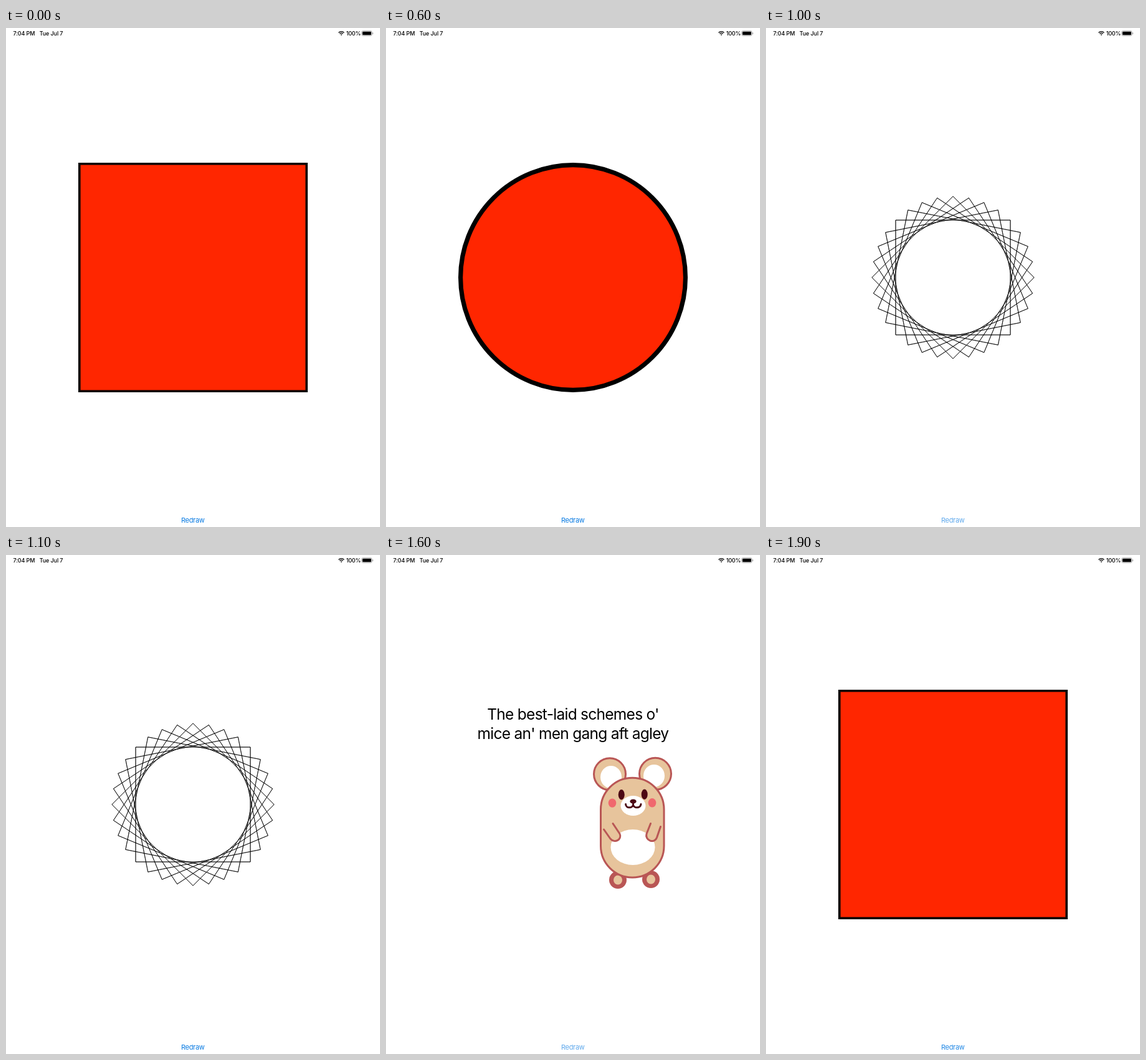
An HTML page with a canvas for the animation above (2000 ms loop, 600 by 800 pixels).

```html
<!DOCTYPE html>
<html lang="en">
<head>
<meta charset="utf-8">
<title>Redraw</title>
<style>
  html, body { margin: 0; width: 100%; height: 100%; overflow: hidden; background: #fff; }
  canvas { display: block; width: 600px; height: 800px; }
</style>
</head>
<body>
<canvas id="stage" width="600" height="800"></canvas>
<script>
const ctx = document.getElementById('stage').getContext('2d');
const LOOP = 2000;
const UNIT = 368 / 512; // the 512-point drawing is shown 368 px wide
const RED = '#ff2600', TAN = '#e7c49c', EDGE = '#b95655', DARK = '#4c0814', PINK = '#f0686e';
const FONT = 'Inter, "Liberation Sans", sans-serif';

function text(str, x, y, size, { weight = 400, color = '#000', align = 'left', spacing = 0 } = {}) {
  ctx.font = `${weight} ${size}px ${FONT}`;
  ctx.letterSpacing = spacing + 'px';
  ctx.textAlign = align;
  ctx.fillStyle = color;
  ctx.fillText(str, x, y);
}

function paint(fill, stroke, width) {
  if (fill) { ctx.fillStyle = fill; ctx.fill(); }
  if (stroke) { ctx.strokeStyle = stroke; ctx.lineWidth = width; ctx.stroke(); }
}

function oval(x, y, rx, ry, fill, stroke, width) {
  ctx.beginPath();
  ctx.ellipse(x, y, rx, ry, 0, 0, Math.PI * 2);
  paint(fill, stroke, width);
}

function rounded(x, y, w, h, r, fill, stroke, width) {
  ctx.beginPath();
  ctx.roundRect(x, y, w, h, r);
  paint(fill, stroke, width);
}

function shape(d, fill, stroke, width) {
  const path = new Path2D(d);
  if (fill) { ctx.fillStyle = fill; ctx.fill(path); }
  if (stroke) { ctx.strokeStyle = stroke; ctx.lineWidth = width; ctx.stroke(path); }
}

// Runs a drawing in its own 512-point space, clipped to it.
function inCanvas(draw) {
  ctx.save();
  ctx.translate(116, 216);
  ctx.scale(UNIT, UNIT);
  ctx.beginPath();
  ctx.rect(0, 0, 512, 512);
  ctx.clip();
  ctx.beginPath();
  draw();
  ctx.restore();
}

const square = () => inCanvas(() => {
  ctx.rect(0, 0, 512, 512);
  paint(RED, '#000', 10);
});

const circle = () => inCanvas(() => oval(256, 256, 251, 251, RED, '#000', 10));

const checkers = () => {
  ctx.fillStyle = '#000';
  for (let row = 0; row < 8; row++) {
    for (let col = row % 2; col < 8; col += 2) ctx.fillRect(116 + col * 46, 216 + row * 46, 46, 46);
  }
};

const rosette = () => inCanvas(() => {
  ctx.translate(256, 256);
  for (let i = 0; i < 16; i++) {
    ctx.rotate(Math.PI / 16);
    ctx.rect(-128, -128, 256, 256);
  }
  paint(null, '#000', 1);
});

const swirl = () => inCanvas(() => {
  ctx.translate(256, 256);
  let length = 256;
  for (let i = 0; i < 256; i++) {
    ctx.rotate(Math.PI / 2);
    ctx.lineTo(length, 50);
    length *= 0.99;
  }
  paint(null, '#000', 1);
});

function mouse() {
  ctx.lineCap = ctx.lineJoin = 'round';
  oval(359, 351.3, 25.5, 25.5, TAN, EDGE, 3);
  oval(432, 350.8, 25.5, 25.5, TAN, EDGE, 3);
  oval(361, 356, 17, 18, '#fff');
  oval(430, 354, 17, 18, '#fff');

  for (const [x, y] of [[372, 521], [425, 520]]) {
    oval(x, y, 14, 14, EDGE);
    oval(x, y, 7, 7.5, TAN);
  }

  rounded(344.5, 357.3, 101.5, 159.7, 50.7, TAN, EDGE, 3);
  oval(396, 468.5, 35.5, 28.5, '#fff');
  shape('M349.5 440L360 455C367 463 379 456 375 447L364 430.5', TAN, EDGE, 3);
  shape('M424.5 430.5L418 447C415 457 430 464 434.5 453L440.5 435.5', TAN, EDGE, 3);

  oval(396.5, 402, 20, 16, '#fff');
  oval(377.7, 384.3, 5, 8.2, DARK);
  oval(414.7, 383.7, 5, 8.2, DARK);
  oval(363, 397.6, 6.3, 7.2, PINK);
  oval(427, 397.3, 6.3, 7.2, PINK);
  oval(396.5, 395, 5.2, 3.5, DARK);
  shape('M384.5 399.5C385 407 396 406 396.5 400C397 406 408 407 409 399.5M396.5 396V400', null, DARK, 3);
}

function poem() {
  const style = { align: 'center', spacing: -0.73 };
  text("The best-laid schemes o'", 300, 263.8, 24.5, style);
  text("mice an' men gang aft agley", 300, 294.7, 24.5, style);
  mouse();
}

function statusBar() {
  const style = { weight: 500, spacing: -0.12 };
  text('7:04 PM', 11.5, 11.8, 9, style);
  text('Tue Jul 7', 53.7, 11.8, 9, style);
  text('100%', 545.8, 11.8, 9, { weight: 500, spacing: -0.25 });

  ctx.lineCap = 'butt';
  for (const r of [0.9, 3.7, 6.3]) {
    ctx.beginPath();
    ctx.arc(538, 11.9, r, -Math.PI * 0.75, -Math.PI * 0.25);
    paint(null, '#000', r < 1 ? 1.8 : 1.4);
  }
  rounded(570.6, 4.6, 16.6, 7.8, 2.2, null, '#999', 0.8);
  rounded(571.8, 5.8, 14.2, 5.4, 1.2, '#000');
  rounded(588, 7, 1, 3, 0.5, '#999');
}

// start time, drawing, button opacity
const SCENES = [
  [0, square, 1],
  [500, circle, 0.65], [600, circle, 1],
  [800, checkers, 0.92], [900, checkers, 1],
  [1000, rosette, 0.65], [1100, rosette, 1],
  [1300, swirl, 0.65], [1400, swirl, 1],
  [1600, poem, 0.65], [1700, poem, 1],
  [1900, square, 0.9]
];

function render(now) {
  const t = now % LOOP;
  const [, draw, alpha] = SCENES.findLast(([start]) => start <= t);
  ctx.fillStyle = '#fff';
  ctx.fillRect(0, 0, 600, 800);
  draw();
  statusBar();
  ctx.globalAlpha = alpha;
  text('Redraw', 299.7, 793.4, 11, { color: '#0a7be2', align: 'center', spacing: -0.3 });
  ctx.globalAlpha = 1;
}

const began = performance.now();
function tick() {
  render(performance.now() - began);
  requestAnimationFrame(tick);
}
tick();
</script>
</body>
</html>
```
